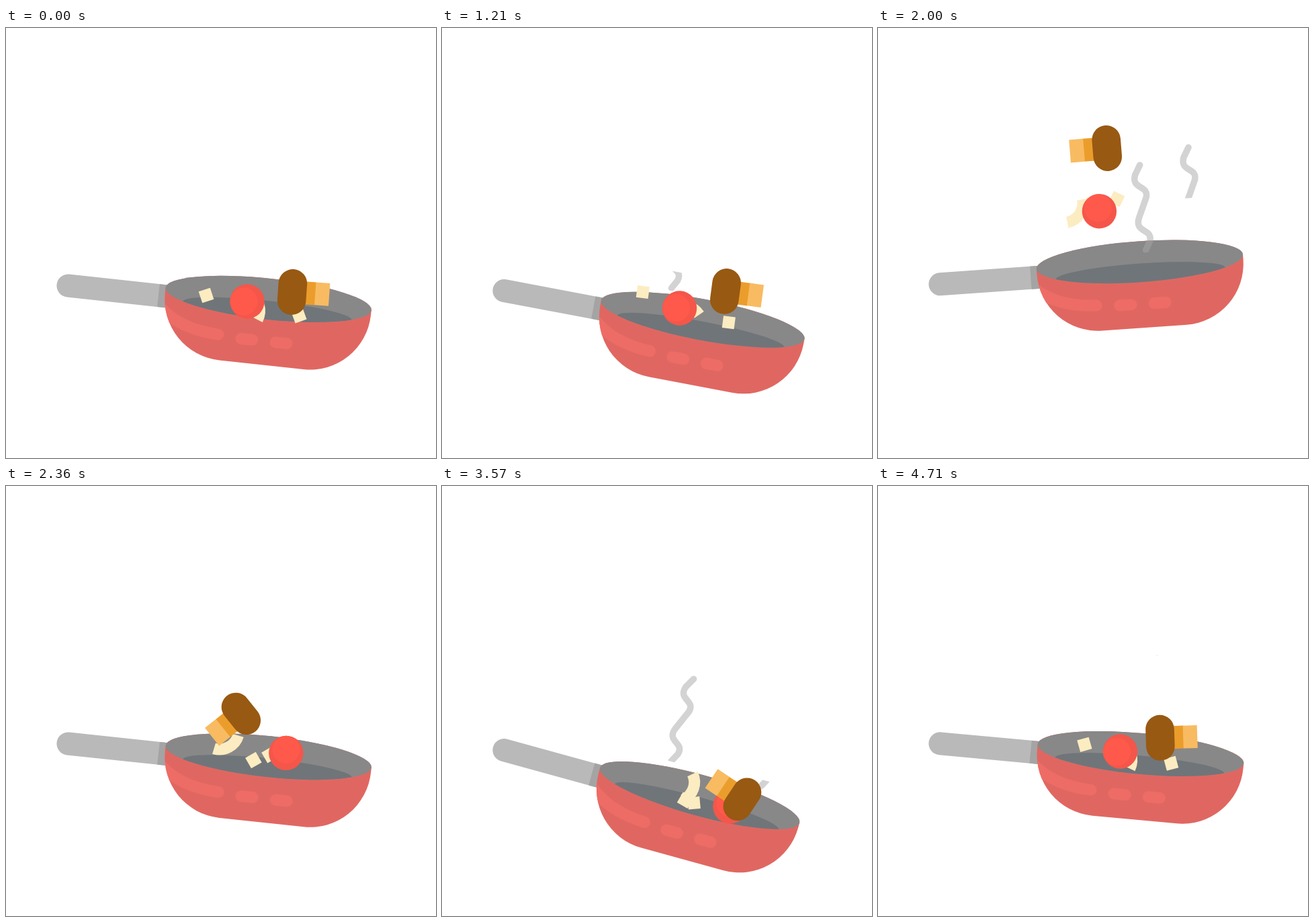
An HTML page with a canvas that plays this animation: 640x640 px, repeating every 4780 ms.

```html
<!DOCTYPE html>
<html>
<head>
<meta charset="utf-8">
<title>Frying pan</title>
<style>
  html, body { margin: 0; width: 100%; height: 100%; overflow: hidden; background: #fff; }
  canvas { display: block; }
</style>
</head>
<body>
<canvas id="stage" width="640" height="640"></canvas>
<script>
const ctx = document.getElementById('stage').getContext('2d');
const LOOP = 4780, TOSS = 2420, RAD = Math.PI / 180;
const LAUNCH = 1140, APEX = 1740, LANDING = 2400;
const HANDLE_X = 92.4, REST_Y = 383.5, REST_TILT = 6.2;
const CREAM = '#fcecc1';

const ease = u => (1 - Math.cos(Math.PI * Math.min(1, Math.max(0, u)))) / 2;
const blend = (a, b, u) => a.map((v, i) => v + (b[i] - v) * u);

// Each toss: the pan dips, flicks up and settles
function panAt(s) {
  const dip = ease((s - 196) / 510), lift = ease((s - 1080) / 450), settle = ease((s - 1530) / 870);
  const move = (rest, low, high) =>
    rest + (low - rest) * dip + (high - low) * lift + (rest - high) * settle;
  return { dip, tilt: move(REST_TILT, 17.5, -17.3), y: move(REST_Y, 394, 378.4) };
}

// Moves a pose [x, y, turn] along with the dipping pan
function carry([x, y, turn], pan) {
  const tip = pan.tilt - REST_TILT;
  return [x, y + tip * RAD * (x - HANDLE_X) + pan.y - REST_Y, turn + tip];
}

// Poses: landed, ready and apex for the first toss, then for the second
function foodAt(poses, toss, s) {
  const [landed, ready, apex] = poses.slice(toss * 3);
  if (s < LAUNCH) return carry(blend(landed, ready, panAt(s).dip), panAt(s));
  if (s > APEX) return blend(apex, poses[toss ? 0 : 3], ease((s - APEX) / (LANDING - APEX)));
  const up = (s - LAUNCH) / (APEX - LAUNCH), from = carry(ready, panAt(LAUNCH));
  const [x, , turn] = blend(from, apex, ease(up));
  return [x, apex[1] + (from[1] - apex[1]) * (1 - up) ** 2, turn];
}

const slice = {
  poses: [[376, 412, -18], [367, 414, -93], [284, 219, 19], [332, 390, 62], [374, 402, 10], [374, 205, -46]],
  draw() {
    ctx.beginPath();
    ctx.arc(-29, 0, 29, -Math.PI / 4, Math.PI / 4);
    ctx.strokeStyle = CREAM;
    ctx.lineWidth = 17;
    ctx.lineCap = 'butt';
    ctx.stroke();
  }
};
const drawCube = () => rect(CREAM, -9, -9, 18, 18);
const leftCube = {
  poses: [[298, 398, -18], [299, 408, -2], [296, 183, 2], [369, 410, -30], [375, 424, -15], [441, 197, 15]],
  draw: drawCube
};
const rightCube = {
  poses: [[436, 428, -20], [430, 445, -4], [336, 179, 54], [393, 402, -31], [362, 422, 20], [440, 197, 60]],
  draw: drawCube
};
const tomato = {
  poses: [[359, 407, 180], [356, 422, 172], [284, 208, 235], [418, 399, 270], [429, 419, 260], [381, 226, 90]],
  draw() {
    disc('#f5564a', 0, 25.7);
    disc('#ff594b', 5, 20.5);
  }
};
const mushroom = {
  poses: [[426, 393, 4], [425, 410, 4], [336, 96, -167], [350, 341, -219], [447, 409, -156], [334, 116, -86]],
  draw() {
    rect('#eb9d2c', 18, -17, 17, 34);
    rect('#f8bb62', 34.3, -17, 21, 34);
    shape('#985912', () => ctx.roundRect(-21.3, -34, 42.6, 68, 21.3));
  }
};

// Base in pan space, start and life time
const puffs = [
  [247, -54, 1108, 670], [386, -54, 1478, 725], [312, -33, 1690, 600],
  [247, -54, 3170, 725], [386, -54, 3497, 725], [312, -33, 4115, 610]
];
const wisp = new Path2D('M-3 4L4 -9C10 -28 -18 -22 -10 -44L3 -74C9 -93 -19 -87 -11 -109L-3 -123');

function at(x, y, degrees, draw) {
  ctx.save();
  ctx.translate(x, y);
  ctx.rotate(degrees * RAD);
  draw();
  ctx.restore();
}

function shape(color, build) {
  ctx.beginPath();
  build();
  ctx.fillStyle = color;
  ctx.fill();
}

function rect(color, x, y, w, h) {
  ctx.fillStyle = color;
  ctx.fillRect(x, y, w, h);
}

const disc = (color, x, r) => shape(color, () => ctx.arc(x, 0, r, 0, 7));
const rim = () => ctx.ellipse(298.7, -12.5, 154, 30.5, 0, 0, 7);

function drawPan() {
  shape('#b9b9b9', () => ctx.roundRect(-17, -17, 180, 34, 17));
  rect('#a4a4a4', 135.3, -17, 25, 34);

  ctx.save();
  shape('#e06761', () => {
    ctx.moveTo(144.7, -12.5);
    ctx.arc(235.7, -5, 91, Math.PI, Math.PI / 2, true);
    ctx.arc(361.7, -5, 91, Math.PI / 2, 0, true);
    ctx.lineTo(452.7, -12.5);
  });
  ctx.clip();
  ctx.beginPath();
  ctx.moveTo(140, 17);
  ctx.quadraticCurveTo(172, 46, 230, 48);
  for (const x of [264.5, 316]) {
    ctx.moveTo(x, 50.5);
    ctx.lineTo(x + 17, 50.5);
  }
  ctx.strokeStyle = '#ee6c66';
  ctx.lineWidth = 17;
  ctx.lineCap = 'round';
  ctx.stroke();
  ctx.restore();

  shape('#e06761', rim);
  ctx.save();
  shape('#888', rim);
  ctx.clip();
  shape('#707579', () => ctx.ellipse(298.7, 5.2, 126.5, 15, 0, 0, 7));
  ctx.restore();
}

// Every wisp is revealed, then erased, from the bottom up
function drawSteam(t) {
  ctx.strokeStyle = 'rgba(168,168,168,.5)';
  ctx.lineWidth = 9.5;
  ctx.lineCap = ctx.lineJoin = 'round';
  for (const [x, y, start, life] of puffs) {
    const u = (t - start) / life * 2;
    if (u <= 0 || u >= 2) continue;
    const top = 8 - 136 * ease(u), bottom = 8 - 136 * ease(u - 1);
    at(x, y, 0, () => {
      ctx.beginPath();
      ctx.rect(-30, top, 60, bottom - top);
      ctx.clip();
      ctx.stroke(wisp);
    });
  }
}

function render(t) {
  const toss = Math.floor(t / TOSS), s = t % TOSS;
  const pan = panAt(s);
  const onPan = draw => at(HANDLE_X, pan.y, pan.tilt, draw);
  const toFood = food => at(...foodAt(food.poses, toss, s), food.draw);

  rect('#fff', 0, 0, 640, 640);
  onPan(drawPan);
  [slice, leftCube, rightCube, tomato].forEach(toFood);
  onPan(() => drawSteam(t));
  toFood(mushroom);
}

const began = performance.now();
function tick() {
  render((performance.now() - began) % LOOP);
  requestAnimationFrame(tick);
}
tick();
</script>
</body>
</html>
```
